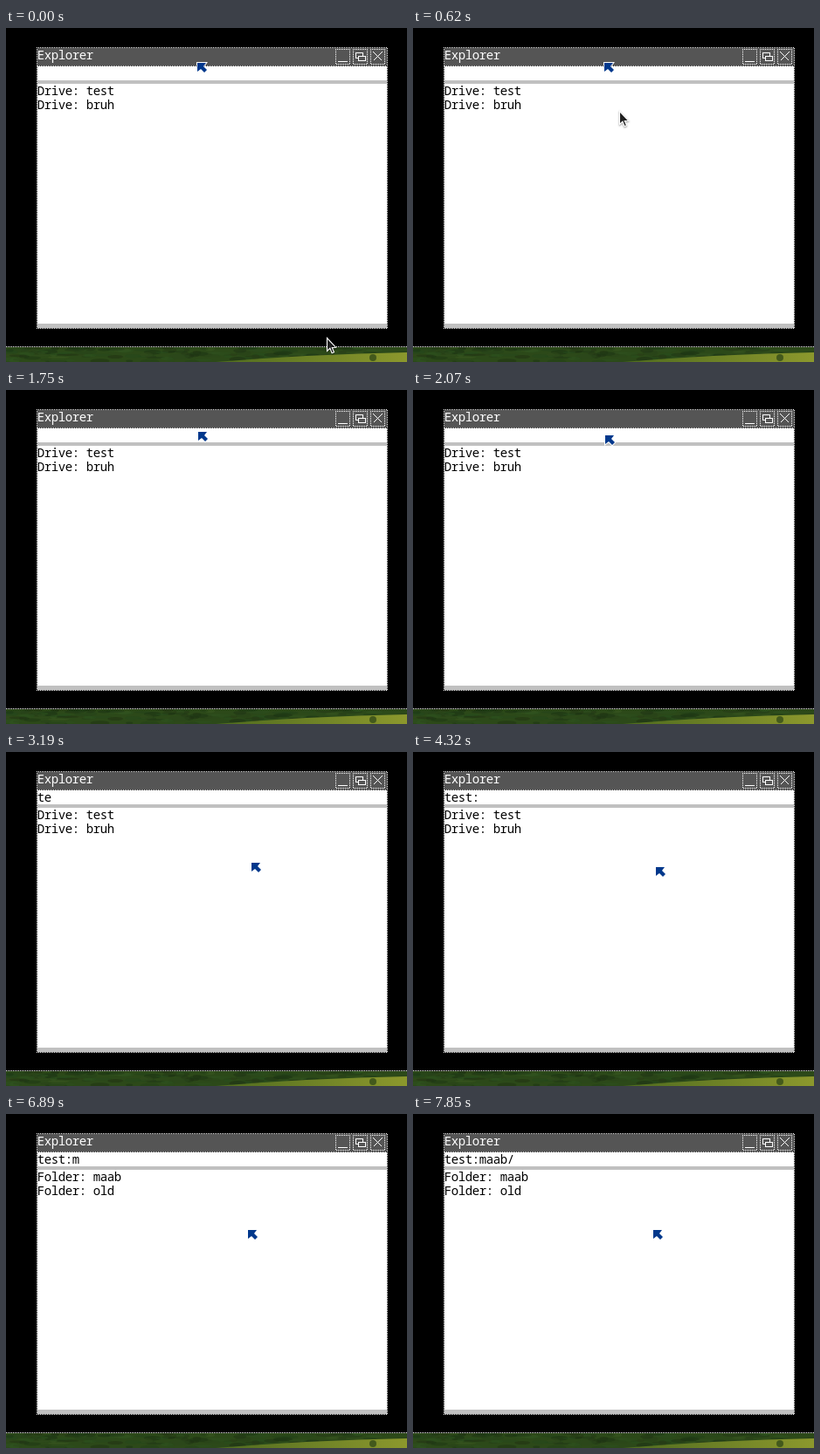
An HTML page with a canvas that plays this animation: 459x383 px, repeating every 8000 ms.

```html
<!DOCTYPE html>
<html lang="en">
<head>
<meta charset="utf-8">
<title>Explorer</title>
<style>
  html, body { margin: 0; width: 100%; height: 100%; overflow: hidden; background: #000; }
  canvas { display: block; }
</style>
</head>
<body>
<canvas id="stage" width="459" height="383"></canvas>
<script>
const ctx = document.getElementById('stage').getContext('2d');
const LOOP = 8000, STEP = 160, CELL = 8;

// Key points [time, x, y], eased in between.
const hostPath = [[0, 367, 355], [640, 236, 95], [960, 226, 37]];
const guestPath = [
  [1280, 219, 40], [2080, 220, 52], [2240, 220, 52], [2720, 282, 125],
  [4320, 278, 132], [5440, 278, 132], [5760, 277, 133], [6880, 277, 133], [7520, 275, 133]
];
// Each burst types one character per step.
const bursts = [['test', 3040], [':', 4000], ['maab', 6880], ['/', 7840]];
const HOST_HIDDEN = 1120, CLICK = 1280, FOLDERS_SHOWN = 5440;

const hostShape = [[0, 0], [0, 15], [3.4, 11.8], [5.6, 17.2], [8, 16.2], [5.8, 10.9], [10, 10.7]];
const guestShape = [[0, 0], [10, 0], [7, 4], [11, 8], [8, 11], [4, 7], [0, 10]];

const ease = p => p * p * (3 - 2 * p);

function along(path, t) {
  const next = path.findIndex(key => key[0] > t);
  if (next === 0) return path[0].slice(1);
  if (next < 0) return path.at(-1).slice(1);
  const [t0, x0, y0] = path[next - 1], [t1, x1, y1] = path[next];
  const p = ease((t - t0) / (t1 - t0));
  return [Math.round(x0 + (x1 - x0) * p), Math.round(y0 + (y1 - y0) * p)];
}

function seeded(seed) {
  return () => (seed = seed * 16807 % 2147483647) / 2147483647;
}

function rect(x, y, w, h, color) {
  ctx.fillStyle = color;
  ctx.fillRect(x, y, w, h);
}

function frame(x, y, w, h) {
  ctx.strokeStyle = '#fff';
  ctx.lineWidth = 1;
  ctx.strokeRect(x + .5, y + .5, w - 1, h - 1);
}

// Stippled lines share one checkerboard: pixels with odd x + y are lit.
function dots(x, y, w, h) {
  ctx.fillStyle = '#fff';
  for (let i = 0; i < Math.max(w, h); i++) {
    const px = w > h ? x + i : x, py = w > h ? y : y + i;
    if ((px + py) % 2) ctx.fillRect(px, py, 1, 1);
  }
}

function dottedFrame(x, y, w, h) {
  dots(x, y, w, 1);
  dots(x, y + h - 1, w, 1);
  dots(x, y, 1, h);
  dots(x + w - 1, y, 1, h);
}

function trace(points, x, y) {
  ctx.beginPath();
  points.forEach(([px, py]) => ctx.lineTo(x + px, y + py));
  ctx.closePath();
}

function label(text, baseline, color = '#000') {
  ctx.font = '300 14px "Noto Sans Mono", monospace';
  ctx.textAlign = 'center';
  ctx.fillStyle = color;
  [...text].forEach((char, i) => ctx.fillText(char, 36 + CELL * (i + .5), baseline));
}

function ellipse(x, y, rx, ry, color) {
  ctx.fillStyle = color;
  ctx.beginPath();
  ctx.ellipse(x, y, rx, ry, 0, 0, 2 * Math.PI);
  ctx.fill();
}

function wallpaper() {
  const random = seeded(7);
  ctx.save();
  ctx.beginPath();
  ctx.rect(0, 366, 459, 17);
  ctx.clip();
  rect(0, 366, 459, 17, '#2c4919');
  for (let i = 0; i < 160; i++) {
    const hue = 90 + 20 * random(), light = 12 + 13 * random();
    ellipse(459 * random(), 366 + 17 * random(), 4 + 9 * random(), 1 + 2 * random(),
      `hsla(${hue}, 45%, ${light}%, .5)`);
  }
  const field = ctx.createLinearGradient(240, 0, 459, 0);
  field.addColorStop(0, '#4f6b1f');
  field.addColorStop(1, '#8c982d');
  ctx.fillStyle = field;
  ctx.beginPath();
  ctx.moveTo(240, 383);
  ctx.quadraticCurveTo(350, 374, 459, 372);
  ctx.lineTo(459, 383);
  ctx.fill();
  ellipse(420, 378, 4, 4, '#43591c');
  ctx.restore();
  dots(0, 365, 459, 1);
}

function buttons() {
  [377, 397, 417].forEach(x => dottedFrame(x, 24, 17, 18));
  rect(380, 38, 11, 1, '#fff');
  frame(400, 28, 9, 7);
  rect(403, 32, 9, 6, '#555');
  frame(403, 32, 9, 6);
  for (let i = 0; i < 10; i++) {
    rect(420 + i, 27 + i, 1, 1, '#fff');
    rect(430 - i, 27 + i, 1, 1, '#fff');
  }
}

function explorer(t) {
  rect(36, 23, 400, 20, '#555');
  rect(36, 44, 400, 300, '#fff');
  rect(36, 60, 400, 4, '#c0c0c0');
  rect(36, 339, 400, 5, '#c0c0c0');
  dottedFrame(35, 22, 402, 323);
  dots(35, 43, 402, 1);
  buttons();

  label('Explorer', 36, '#fff');
  const typed = bursts.map(([text, start]) => text.slice(0, Math.max(0, (t - start) / STEP + 1)));
  label(typed.join(''), 57);
  const entries = t < FOLDERS_SHOWN
    ? ['Drive: test', 'Drive: bruh']
    : ['Folder: maab', 'Folder: old'];
  entries.forEach((entry, i) => label(entry, 77 + 16 * i));
}

function guestCursor(t) {
  trace(guestShape, ...along(guestPath, t));
  ctx.strokeStyle = '#fff';
  ctx.lineWidth = 2;
  ctx.stroke();
  ctx.fillStyle = '#00388c';
  ctx.fill();
}

function hostCursor(t) {
  if (t >= HOST_HIDDEN) return;
  const [x, y] = along(hostPath, t);
  ctx.save();
  trace(hostShape, x + .5, y + .5);
  ctx.fillStyle = '#222';
  ctx.fill();
  ctx.shadowColor = 'rgba(0,0,0,.5)';
  ctx.shadowBlur = 2;
  ctx.shadowOffsetY = 1;
  ctx.strokeStyle = '#fff';
  ctx.lineWidth = 1.1;
  ctx.stroke();
  ctx.restore();
}

function clickHighlight(t) {
  if (t === CLICK) ellipse(226.2, 36.2, 12, 12, 'rgba(225,215,0,.62)');
}

function draw(now) {
  const t = Math.floor((now % LOOP + 20) / STEP) * STEP;
  rect(0, 0, 459, 383, '#000');
  wallpaper();
  explorer(t);
  guestCursor(t);
  clickHighlight(t);
  hostCursor(t);
}

let start;
function tick(now) {
  start ??= now;
  draw(now - start);
  requestAnimationFrame(tick);
}
draw(0);
requestAnimationFrame(tick);
</script>
</body>
</html>
```
